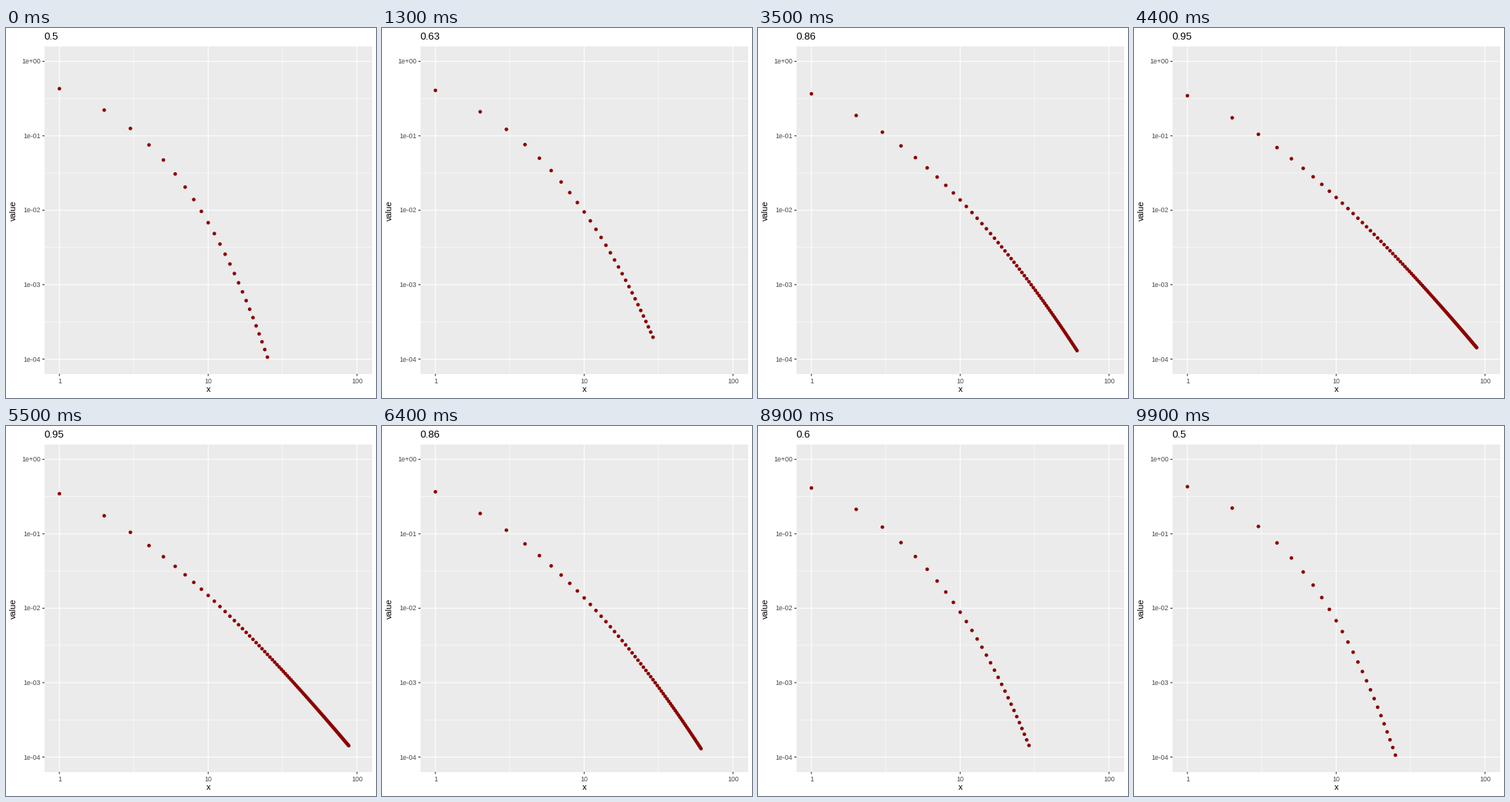
Animation, 480 px wide and 480 px high, one loop 10000 ms. Source, as a matplotlib script:

```python
import matplotlib.pyplot as plt
import numpy as np
from matplotlib.animation import FuncAnimation
from matplotlib.patches import Rectangle

SIZE, DPI = 480, 80
PT = 72 / DPI  # points per pixel
LEFT, RIGHT, TOP, BOTTOM = 50.0, 474.5, 24.0, 448.7
X_ONE, X_DECADE = 69.3, 193.0
Y_ONE, Y_DECADE = 43.3, 96.55
STEPS = 50  # frames in one direction
GAMMAS = np.linspace(0.5, 1, 7)
K_MAX, FLOOR = 100, 1e-4
DOT = 4.65

plt.rcParams["font.family"] = "Liberation Sans"


def degree_tail(gamma):
    """Log10 of P(degree > k) in a tree grown with attachment rate k**gamma."""
    rate = np.arange(1, 100001) ** gamma
    low, high = 1.0, 2.5
    for _ in range(36):
        mu = (low + high) / 2
        tail = np.cumprod(rate / (rate + mu))
        # the mean degree of a tree is 2, so the tail sums to 1
        if tail.sum() > 1:
            low = mu
        else:
            high = mu
    tail = tail[:K_MAX]
    return np.log10(tail[tail >= FLOOR])


def px(logx):
    return X_ONE + X_DECADE * np.asarray(logx)


def py(logy):
    return Y_ONE - Y_DECADE * np.asarray(logy)


tails = [degree_tail(g) for g in GAMMAS]
keys = [round((STEPS - 1) * j / (len(GAMMAS) - 1)) for j in range(len(GAMMAS))]

fig = plt.figure(figsize=(SIZE / DPI, SIZE / DPI), dpi=DPI, facecolor="white")
ax = fig.add_axes([0, 0, 1, 1])
ax.set_xlim(0, SIZE)
ax.set_ylim(SIZE, 0)
ax.axis("off")


def line(xs, ys, color, width, z):
    ax.plot(xs, ys, color=color, lw=width * PT, solid_capstyle="butt",
            snap=False, zorder=z)


def label(x, y, text, size, color="black", **kw):
    return ax.text(x, y, text, fontsize=size * PT, color=color,
                   va="baseline", **kw)


ax.add_patch(Rectangle((LEFT, TOP), RIGHT - LEFT, BOTTOM - TOP,
                       color="#EBEBEB", lw=0, zorder=0))

for v in (0.5, 1.5):
    line([px(v)] * 2, [TOP, BOTTOM], "white", 0.53, 1)
for v in (-0.5, -1.5, -2.5, -3.5):
    line([LEFT, RIGHT], [py(v)] * 2, "white", 0.53, 1)

for v in range(3):
    x = px(v)
    line([x, x], [TOP, BOTTOM], "white", 1.07, 2)
    line([x, x], [BOTTOM, BOTTOM + 2.75], "#333333", 1.07, 2)
    label(x, 461, str(10 ** v), 8.8, "#4D4D4D", ha="center")
for v in range(0, -5, -1):
    y = py(v)
    line([LEFT, RIGHT], [y, y], "white", 1.07, 2)
    line([LEFT - 2.75, LEFT], [y, y], "#333333", 1.07, 2)
    label(45.05, y + 3.1, f"{10.0 ** v:.0e}", 8.8, "#4D4D4D", ha="right")

label((LEFT + RIGHT) / 2, 472, "x", 11, ha="center")
ax.text(13.4, (TOP + BOTTOM) / 2, "value", fontsize=11 * PT, rotation=90,
        rotation_mode="anchor", ha="center", va="baseline")
title = label(LEFT, 15, "", 13.2, ha="left")

dots = ax.scatter([], [], color="#8B0000", linewidths=0, zorder=3)


def tail_at(step):
    """Blend neighbouring states; new points appear only on a key step."""
    if step in keys:
        return tails[keys.index(step)]
    j = sum(k < step for k in keys) - 1
    a, b = tails[j], tails[j + 1]
    t = (step - keys[j]) / (keys[j + 1] - keys[j])
    return a + (b[:len(a)] - a) * t


def update(frame):
    step = min(frame, 2 * STEPS - 1 - frame)
    values = tail_at(step)
    k = np.arange(1, len(values) + 1)
    dots.set_offsets(np.column_stack([px(np.log10(k)), py(values)]))
    dots.set_sizes(np.full(len(k), (DOT * PT) ** 2))
    gamma = 0.5 + 0.5 * step / (STEPS - 1)
    title.set_text(f"{round(gamma, 2):g}")
    return dots, title


anim = FuncAnimation(fig, update, frames=2 * STEPS, interval=100,
                     init_func=lambda: update(0), repeat=True, repeat_delay=0)
plt.show()
```
